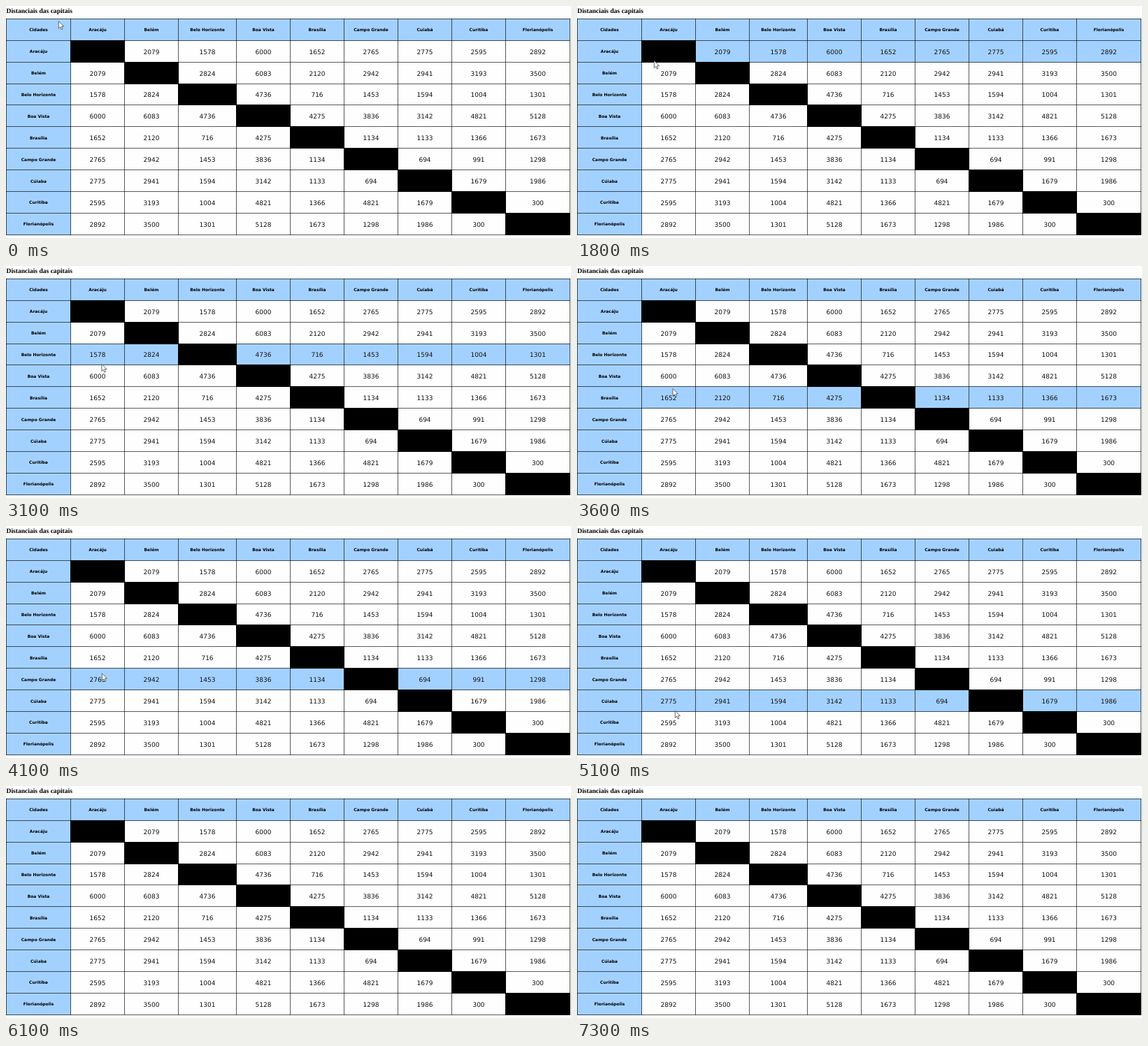
These frames come from a looping animation (808x332 px, 8600 ms). An HTML page:

```html
<!DOCTYPE html>
<html lang="pt-BR">
<head>
<meta charset="utf-8">
<title>Distanciais das capitais</title>
<style>
  html, body { margin: 0; width: 100%; height: 100%; overflow: hidden; background: #fefefe; }
  svg { display: block; }
  text { fill: #000; text-rendering: geometricPrecision; }
  .title { font: bold 9.55px "Liberation Serif", "Times New Roman", serif; }
  .label { font: bold 5.97px "DejaVu Sans", Verdana, sans-serif; text-anchor: middle; }
  .value { font: 9px "DejaVu Sans", Verdana, sans-serif; text-anchor: middle; fill: #111; }
</style>
</head>
<body>
<svg id="stage" width="808" height="332" viewBox="0 0 808 332"></svg>
<script>
const LOOP = 8600, STEP = 100;
const BLUE = '#a3d1ff';
const TOP = 18, PITCH = 30.87, RIGHT = 806;
const LINE = 0.65;
const CITIES = ['Aracáju', 'Belém', 'Belo Horizonte', 'Boa Vista', 'Brasília',
  'Campo Grande', 'Cuiabá', 'Curitiba', 'Florianópolis'];
// Cell text above the diagonal; the lower half mirrors it
const UPPER = `2079 1578 6000 1652 2765 2775 2595 2892
  2824 6083 2120 2942 2941 3193 3500
  4736 716 1453 1594 1004 1301
  4275 3836 3142 4821 5128
  1134 1133 1366 1673
  694 991 1298
  1679 1986
  300`.split('\n').map(line => line.trim().split(' '));
// Pointer path: time, x, y
const PATH = [
  [400, 75, 21.5], [1800, 110, 78], [3100, 136.5, 140],
  [4100, 137, 210.5], [5100, 140, 264], [5900, 143, 321]
];

const svg = document.getElementById('stage');
const lineY = k => Math.round(TOP + PITCH * k);
// Equal columns, one a little wider, and wide ones at both ends
const lineX = c => c === 0 ? 0 : c === 10 ? RIGHT : 15 + 77 * c + (c > 3 ? 6 : 0);
const midX = c => (lineX(c) + lineX(c + 1) + 1) / 2;
const midY = r => TOP + 0.5 + PITCH * (r + 0.5);

function add(tag, attrs, text) {
  const el = document.createElementNS('http://www.w3.org/2000/svg', tag);
  for (const key in attrs) el.setAttribute(key, attrs[key]);
  if (text !== undefined) el.textContent = text;
  return svg.appendChild(el);
}
const rect = (x, y, width, height, fill) => add('rect', { x, y, width, height, fill });
const area = (c0, r0, c1, r1, fill) =>
  rect(lineX(c0), lineY(r0), lineX(c1) - lineX(c0) + 1, lineY(r1) - lineY(r0) + 1, fill);
const label = (r, c, text) => add('text', { class: 'label', x: midX(c), y: midY(r) + 2.5 }, text);

function distance(r, c) {
  if (r === 7 && c === 5) return '4821';
  const a = Math.min(r, c), b = Math.max(r, c);
  return UPPER[a][b - a - 1];
}

area(0, 0, 10, 1, BLUE);
area(0, 0, 1, 10, BLUE);
const rows = CITIES.map((_, r) => area(1, r + 1, 10, r + 2, BLUE));

const inset = (1 - LINE) / 2;
for (let k = 0; k <= 10; k++) {
  rect(0, lineY(k) + inset, RIGHT + 1, LINE, '#000');
  rect(lineX(k) + inset, TOP, LINE, lineY(10) - TOP + 1, '#000');
}
CITIES.forEach((_, i) => area(i + 1, i + 1, i + 2, i + 2, '#000'));

add('text', { class: 'title', x: 0.5, y: 10 }, 'Distanciais das capitais');
label(0, 0, 'Cidades');
CITIES.forEach((city, r) => {
  label(0, r + 1, city);
  label(r + 1, 0, city === 'Cuiabá' ? 'Cúiaba' : city);
  CITIES.forEach((_, c) => {
    if (r !== c) add('text', { class: 'value', x: midX(c + 1), y: midY(r + 1) + 3.9 }, distance(r, c));
  });
});

const pointer = add('path', {
  d: 'M.3 .3V10.6L2.7 8.4L4.3 12.1L6 11.3L4.4 7.7H7.6Z',
  fill: '#fff', stroke: '#444', 'stroke-width': 0.8
});

function locate(t) {
  if (t <= PATH[0][0]) return PATH[0].slice(1);
  const i = PATH.findIndex(p => p[0] >= t);
  if (i < 0) return [0, 400];
  const [t0, x0, y0] = PATH[i - 1], [t1, x1, y1] = PATH[i];
  const k = (t - t0) / (t1 - t0);
  return [x0 + (x1 - x0) * k, y0 + (y1 - y0) * k];
}

function draw(now) {
  const t = Math.floor((now % LOOP) / STEP) * STEP;
  const [x, y] = locate(t);
  const hover = Math.floor((y - TOP - 0.5) / PITCH) - 1;
  rows.forEach((row, r) => row.setAttribute('visibility', r === hover ? 'visible' : 'hidden'));
  pointer.setAttribute('transform', `translate(${x} ${y})`);
}

const start = performance.now();
function tick() {
  draw(performance.now() - start);
  requestAnimationFrame(tick);
}
tick();
</script>
</body>
</html>
```
